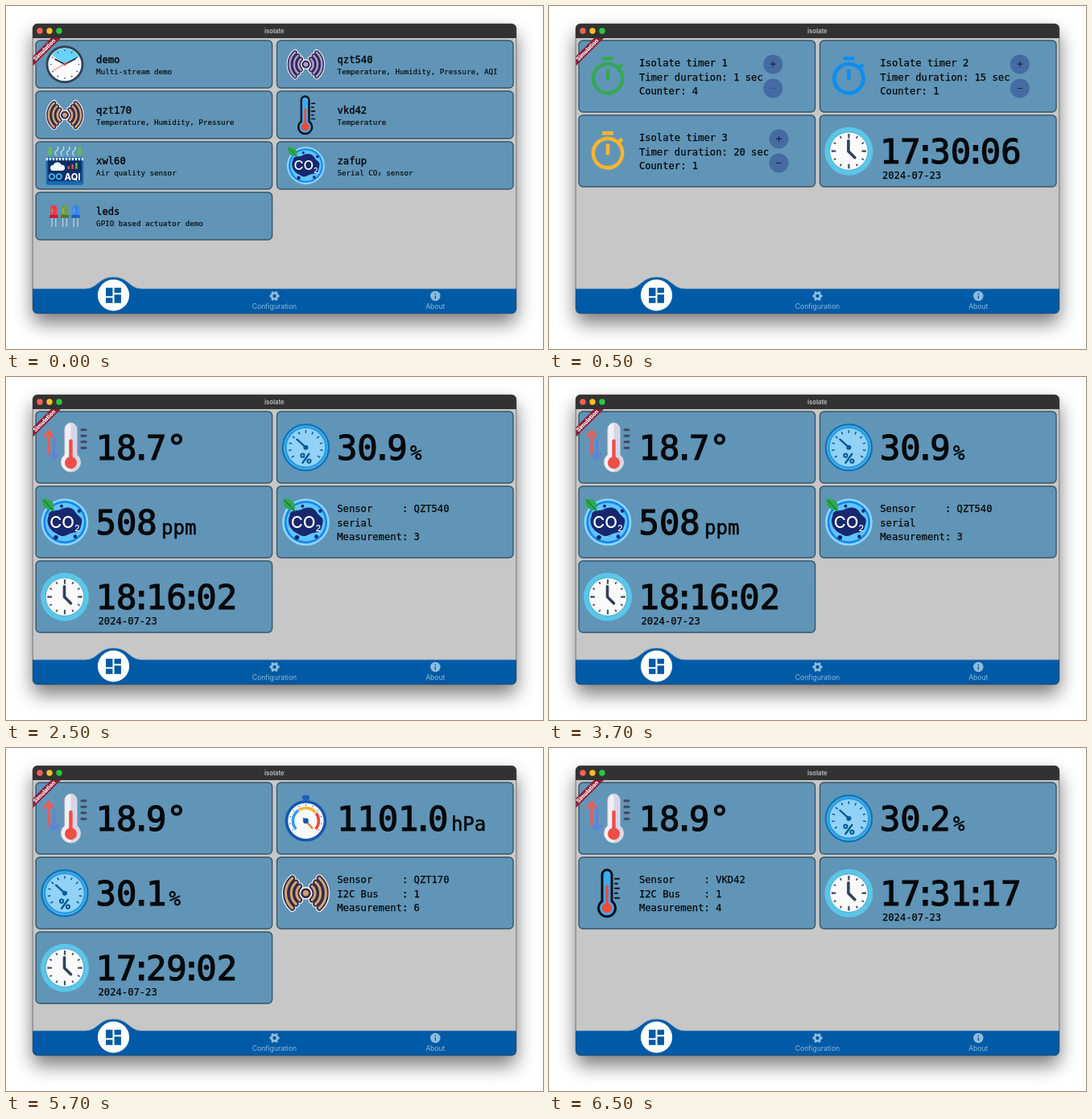
An HTML page for the animation above (8 s loop, 667 px wide and 427 px high).

```html
<!DOCTYPE html>
<html lang="en">
<head>
<meta charset="utf-8">
<title>Sensor dashboard</title>
<style>
  html, body { margin: 0; width: 100%; height: 100%; overflow: hidden; background: #fff; }
  svg { display: block; width: 100vw; height: 100vh; }
  .mono { font-family: "DejaVu Sans Mono", monospace; white-space: pre; fill: #06080a; stroke: #06080a; }
  .head { font-size: 12.18px; stroke-width: .4px; }
  .sub { font-size: 9.2px; stroke-width: .15px; }
  .line { font-size: 12.18px; stroke-width: .25px; }
  .big { font-size: 42.2px; stroke-width: 1.2px; }
  .unit { font-size: 24px; stroke-width: .6px; }
  .ui { font-family: Inter, sans-serif; text-anchor: middle; }
</style>
</head>
<body>
<svg viewBox="0 0 667 427">
  <defs>
    <filter id="shadow" x="-10%" y="-10%" width="120%" height="125%">
      <feGaussianBlur stdDeviation="11.5"/>
    </filter>
    <clipPath id="window"><rect x="33" y="22" width="601" height="361" rx="6"/></clipPath>
    <clipPath id="content"><rect x="33.5" y="40" width="600" height="343"/></clipPath>
  </defs>
  <rect x="33" y="34" width="601" height="361" rx="8" opacity=".52" filter="url(#shadow)"/>
  <g clip-path="url(#window)">
    <rect x="33" y="22" width="601" height="361" fill="#c7c7c7"/>
    <rect x="33" y="22" width="601" height="18" fill="#323232"/>
    <circle cx="42" cy="31" r="3.7" fill="#ff5f57"/>
    <circle cx="54" cy="31" r="3.7" fill="#febc2e"/>
    <circle cx="66" cy="31" r="3.7" fill="#28c840"/>
    <text class="ui" x="333.3" y="33.6" font-size="7.6" font-weight="700" fill="#b4b4b4">isolate</text>
    <g id="pages"></g>
    <g clip-path="url(#content)">
      <g transform="translate(47.5 54.5) rotate(-45)">
        <rect x="-40" y="-4.3" width="80" height="8.6" fill="#8c1f36"/>
        <text y="2.5" text-anchor="middle" font-family="Roboto, sans-serif" font-size="7.3" font-weight="900" fill="#fff">Simulation</text>
      </g>
    </g>
    <path d="M32 352H98C114 352 115 337.5 133.5 337.5S153 352 169 352H635V384H32z" fill="#005aa5" stroke="#6f9fc4" stroke-width=".7"/>
    <circle cx="133.5" cy="360" r="19.6" fill="#fff"/>
    <path transform="translate(120.9 347.6) scale(1.05)" fill="#005aa5"
      d="M3 13h8V3H3zM3 21h8v-6H3zM13 21h8V11h-8zM13 3v6h8V3z"/>
    <g fill="none" stroke="#8fbbdc">
      <circle cx="333.5" cy="361" r="3.6" stroke-width="2.8"/>
      <circle cx="333.5" cy="361" r="5.2" stroke-width="2" pathLength="12" stroke-dasharray="1 1" stroke-dashoffset=".5"/>
    </g>
    <circle cx="533.3" cy="361" r="6.2" fill="#8fbbdc"/>
    <path d="M533.3 357.4v1.5M533.3 360.2v4.2" stroke="#005aa5" stroke-width="1.3"/>
    <g class="ui" font-size="8.6" fill="#8fbbdc">
      <text x="333.5" y="377">Configuration</text>
      <text x="533.3" y="377">About</text>
    </g>
  </g>
  <rect x="33.2" y="22.2" width="600.6" height="360.6" rx="6" fill="none" stroke="#444" stroke-width=".6"/>
</svg>
<script>
const circle = (r, fill, x = 0, y = 0, more = '') => `<circle cx="${x}" cy="${y}" r="${r}" fill="${fill}" ${more}/>`;
const line = (d, color, width, more = 'stroke-linecap="round"') =>
  `<path d="${d}" fill="none" stroke="${color}" stroke-width="${width}" ${more}/>`;
const shape = (d, fill, more = '') => `<path d="${d}" fill="${fill}" ${more}/>`;
const label = (cls, x, y, str) => `<text class="mono ${cls}" x="${x}" y="${y}">${str}</text>`;

// Radial marks between radii a and b
const ticks = (n, a, b, color, width, from = 0, step = 360 / n) =>
  Array.from({ length: n }, (_, i) =>
    line(`M0 ${-a}V${-b}`, color, width, `transform="rotate(${from + i * step})"`)).join('');

const arc = (r, from, to) => {
  const at = a => `${(r * Math.cos(a * Math.PI / 180)).toFixed(2)} ${(r * Math.sin(a * Math.PI / 180)).toFixed(2)}`;
  return `M${at(from)}A${r} ${r} 0 ${to - from > 180 ? 1 : 0} 1 ${at(to)}`;
};

// Icons fill about 60 units around 0,0
const demoClock = () =>
  circle(27.5, '#fff', 0, 0, 'stroke="#2f4358" stroke-width="3.6"') +
  shape('M0 0L-20-15A25 25 0 0 1 22-12z', '#67d3fa') +
  ticks(12, 20.5, 23, '#2f4358', 1.4) +
  line('M-15-8L0 0L17-9', '#18222e', 2) + line('M6-4L-17 9', '#e8433f', 1) + circle(2, '#e8433f');

const waves = color => {
  const arcs = [11.5, 18.2, 25].map(r => arc(r, -48, 48) + arc(r, 132, 228)).join('');
  return line(arcs, '#f4f2f4', 9.4) + circle(8, '#f4f2f4') +
    line(arcs, '#332b48', 6.8) + line(arcs, color, 3.2) +
    circle(5, color, 0, 0, 'stroke="#332b48" stroke-width="2.6"');
};

const thermometer = () =>
  shape('M-7-23a6 6 0 0 1 12 0V10a10.5 10.5 0 1 1-12 0z', '#3fa9f5', 'stroke="#0b1016" stroke-width="3"') +
  line('M-1-9V18', '#f04b32', 3.4) + circle(6.2, '#f04b32', -1, 18.5) +
  line('M9-18h5M9-12h3M9-6h5M9 0h3M9 6h5', '#0b1016', 2);

const airQuality = () =>
  line('M-13-16q-4-4 0-7t2-6M-4-16q-4-4 0-7t2-6M5-16q-4-4 0-7t2-6M14-16q-4-4 0-7t2-6', '#a5e4ee', 1.8) +
  shape('M-25-29h4v7h3l-5 7-5-7h3zM21-29h4v7h3l-5 7-5-7h3z', '#67bd4c') +
  '<rect x="-29" y="-13" width="58" height="43" rx="3" fill="#1769b4"/>' +
  '<rect x="-26" y="-10" width="52" height="34" rx="1" fill="#0b2f66"/>' +
  '<path d="M-29-10H29" stroke="#e6f4fa" stroke-width="4" stroke-dasharray="3 2"/>' +
  shape('M-18 8a4.5 4.5 0 0 1 0-9a7 7 0 0 1 13 0a4.5 4.5 0 0 1 1 9z', '#eef8fd') +
  line('M6 2v2M12-1v5', '#ef4c4c', 3) + line('M18-3v7', '#67bd4c', 3) +
  circle(4, 'none', -20, 17, 'stroke="#43b4f0" stroke-width="2.4"') +
  circle(4, 'none', -9, 17, 'stroke="#43b4f0" stroke-width="2.4"') +
  '<text x="12" y="23" text-anchor="middle" font-family="Inter, sans-serif" font-size="14" font-weight="800" fill="#fff">AQI</text>';

const co2 = () =>
  circle(28, '#1687ee', 0, 0, 'stroke="#8fd6ff" stroke-width="2.6"') +
  circle(24, '#5fc4fb') +
  shape('M-20-8C-20-17-10-13-5-16S9-20 13-13S23-7 21 1S19 12 11 13S0 20-7 16S-15 12-18 8S-23-2-20-8z', '#17286f') +
  circle(2.8, '#17286f', -11, 19) + circle(2.2, '#17286f', 18, -14) +
  circle(2.4, '#17286f', 13, 18) + circle(2, '#17286f', -4, -20) +
  '<text x="0" y="7" text-anchor="middle" font-family="Inter, sans-serif" font-size="20.5" font-weight="500" fill="#fff">CO<tspan font-size="11" dy="4">2</tspan></text>' +
  shape('M-28-29C-20-30-11-26-14-15C-24-14-29-20-28-29z', '#2fa84f') + line('M-26-27L-13-13', '#157239', 1.2);

const leds = () => [['#f0394b', '#c3202f'], ['#729d45', '#527a2b'], ['#3486ee', '#1f62c0']].map(([main, dark], i) =>
  `<g transform="translate(${(i - 1) * 17})">` +
  line('M-3 3V16M3 3V16', '#c8ced3', 1.6) +
  shape('M-5 0V-12a5 5 0 0 1 10 0V0z', main) +
  `<rect x="-6.5" y="-2" width="13" height="5" rx="1" fill="${dark}"/>` +
  line('M-2.5-12V-5', '#fff', 1.3, 'opacity=".4"') + '</g>').join('');

const stopwatch = color =>
  `<path transform="translate(-27.2 -27) scale(2.27)" fill="${color}" d="M9 1h6v2H9zM11 14h2V8h-2zM19.03 7.39l1.42-1.42c-.43-.51-.9-.99-1.41-1.41l-1.42 1.42A9 9 0 1 0 19.03 7.39zM12 20a7 7 0 1 1 0-14a7 7 0 0 1 0 14z"/>`;

const wallClock = () =>
  circle(30, '#5bc6e8') + circle(23.8, '#fafafa', 0, 0, 'stroke="#49acd0" stroke-width="1"') +
  ticks(12, 18.5, 21.5, '#46536a', 1.8) + ticks(4, 16, 21.5, '#46536a', 2.2) +
  line('M-.5-13V0L7.5 8', '#35415a', 3.6, 'stroke-linecap="round" stroke-linejoin="round"');

const temperature = () =>
  line('M-20 8V-20M-25-14L-20-20L-15-14', '#f15b4e', 3.2) +
  line('M-13.5-11V14M-18 9L-13.5 14L-9 9', '#5c83dd', 3.2) +
  shape('M0-23a7.5 7.5 0 0 1 15 0V9a12 12 0 1 1-15 0z', '#f1eff5', 'stroke="#d4d4e2" stroke-width="1"') +
  shape('M7.5-30a7 7 0 0 1 7 7V9a12 12 0 0 1-7 21z', '#d6d5e4') +
  line('M7.5-8V18', '#ef4e46', 4.4) + circle(7.5, '#ef4e46', 7.5, 19) +
  line('M21-22h5M21-14.5h5M21-7h5M21 .5h5', '#424766', 3);

const humidity = () =>
  circle(28.5, '#92d2f7', 0, 0, 'stroke="#0876bd" stroke-width="2.5"') +
  circle(25.2, 'none', 0, 0, 'stroke="#2b9de0" stroke-width="3"') +
  ticks(11, 18, 21.5, '#075b96', 1.5, -125, 25) +
  line('M0 0L-11-10', '#075b96', 2.4) + circle(3, '#075b96') +
  line('M4 8L-4 19', '#075b96', 2.4) +
  circle(2.1, 'none', -4, 10, 'stroke="#075b96" stroke-width="2"') +
  circle(2.1, 'none', 4, 17, 'stroke="#075b96" stroke-width="2"');

const pressure = () =>
  '<rect x="-4.5" y="-29" width="9" height="6" rx="2" fill="#1b5fc0"/>' +
  circle(24, '#f8fbff', 0, 3, 'stroke="#1557ad" stroke-width="3.6"') +
  '<g transform="translate(0 3)">' +
  line(arc(16, 140, 235), '#3b9cf0', 3.6, '') +
  line(arc(16, 238, 320), '#f8b536', 3.6, '') +
  line(arc(16, 323, 400), '#ed4b3d', 3.6, '') +
  ticks(11, 19, 20.5, '#1557ad', 1, -125, 25) +
  line('M-3-3L8 9', '#f27838', 2.4) + circle(3.4, '#1557ad') + '</g>';

// Cards sit in two columns; parts use card coordinates
const grid = (cards, h, pitch) => cards.map((body, i) =>
  `<g transform="translate(${36.5 + 299.4 * (i % 2)} ${43 + pitch * (i >> 1)})">` +
  `<rect x=".6" y="0" width="293.5" height="${h}" rx="5" fill="#6095b7" stroke="#34566b" stroke-width="1.4"/>${body}</g>`).join('');

const icon = (art, y, scale = 1) => `<g transform="translate(36.5 ${y}) scale(${scale})">${art}</g>`;
const item = (art, name, info) =>
  icon(art, 29.7, .8) + label('head', 75.6, 28, name) + label('sub', 75.6, 41.5, info);
const lines = rows => rows.map((row, i) => label('line', 75.4, 32 + 17.5 * i, row)).join('');
const info = (art, rows) => icon(art, 44.7) + lines(rows);

// Points and colons take a narrower cell than digits
const big = str => label('big', 75, 60.3,
  str.replace(/[.:]/g, '<tspan dx="-6.9">$&</tspan><tspan dx="-6.9">&#8203;</tspan>'));
const reading = (art, value, unit = '', x = 0) =>
  icon(art, 44.7) + big(value) + (unit && label('unit', x, 60, unit));
const clock = time => icon(wallClock(), 44.7) + big(time) + label('line', 78, 79, '2024-07-23');

const button = (x, y, sign, opacity = 1) =>
  circle(12, '#456ba2', x, y) +
  line(`M${x - 3.3} ${y}h6.6` + (sign === '+' ? `M${x} ${y - 3.3}v6.6` : ''), '#142447', 1.2, `opacity="${opacity}"`);
const timer = (n, color, secs, count, x, off) =>
  info(stopwatch(color), [`Isolate timer ${n}`, `Timer duration: ${secs} sec`, `Counter: ${count}`]) +
  button(x, 29.4, '+') + button(x, 59.5, '-', off ? .3 : 1);

const sensor = (name, second, n) => [`Sensor     : ${name}`, second, `Measurement: ${n}`];
const tan = '#d0a274', lilac = '#a79bdc';

const pages = [
  [0, grid([
    item(demoClock(), 'demo', 'Multi-stream demo'),
    item(waves(lilac), 'qzt540', 'Temperature, Humidity, Pressure, AQI'),
    item(waves(tan), 'qzt170', 'Temperature, Humidity, Pressure'),
    item(thermometer(), 'vkd42', 'Temperature'),
    item(airQuality(), 'xwl60', 'Air quality sensor'),
    item(co2(), 'zafup', 'Serial CO₂ sensor'),
    item(leds(), 'leds', 'GPIO based actuator demo')
  ], 59, 63)],
  [500, grid([
    timer(1, '#35a852', 1, 4, 241.8, true),
    timer(2, '#0b8df0', 15, 1, 249),
    timer(3, '#fdb52d', 20, 1, 249),
    clock('17:30:06')
  ], 89, 93)],
  [2500, grid([
    reading(temperature(), '18.7°'),
    reading(humidity(), '30.9', '%', 166),
    reading(co2(), '508', 'ppm', 156.5),
    info(co2(), sensor('QZT540', 'serial', 3)),
    clock('18:16:02')
  ], 89, 93)],
  [4500, grid([
    reading(temperature(), '18.9°'),
    reading(pressure(), '1101.0', 'hPa', 217),
    reading(humidity(), '30.1', '%', 166),
    info(waves(tan), sensor('QZT170', 'I2C Bus    : 1', 6)),
    clock('17:29:02')
  ], 89, 93)],
  [6500, grid([
    reading(temperature(), '18.9°'),
    reading(humidity(), '30.2', '%', 166),
    info(thermometer(), sensor('VKD42', 'I2C Bus    : 1', 4)),
    clock('17:31:17')
  ], 89, 93)]
];

const root = document.getElementById('pages');
root.innerHTML = pages.map(([, body]) => `<g display="none">${body}</g>`).join('');
const groups = [...root.children];
const begin = performance.now();
let shown = -1;

function draw(now) {
  const t = Math.max(0, now - begin) % 8000;
  const current = pages.findLastIndex(([start]) => t >= start);
  if (current !== shown) {
    groups.forEach((g, i) => g.setAttribute('display', i === current ? 'inline' : 'none'));
    shown = current;
  }
  requestAnimationFrame(draw);
}
draw(begin);
</script>
</body>
</html>
```
